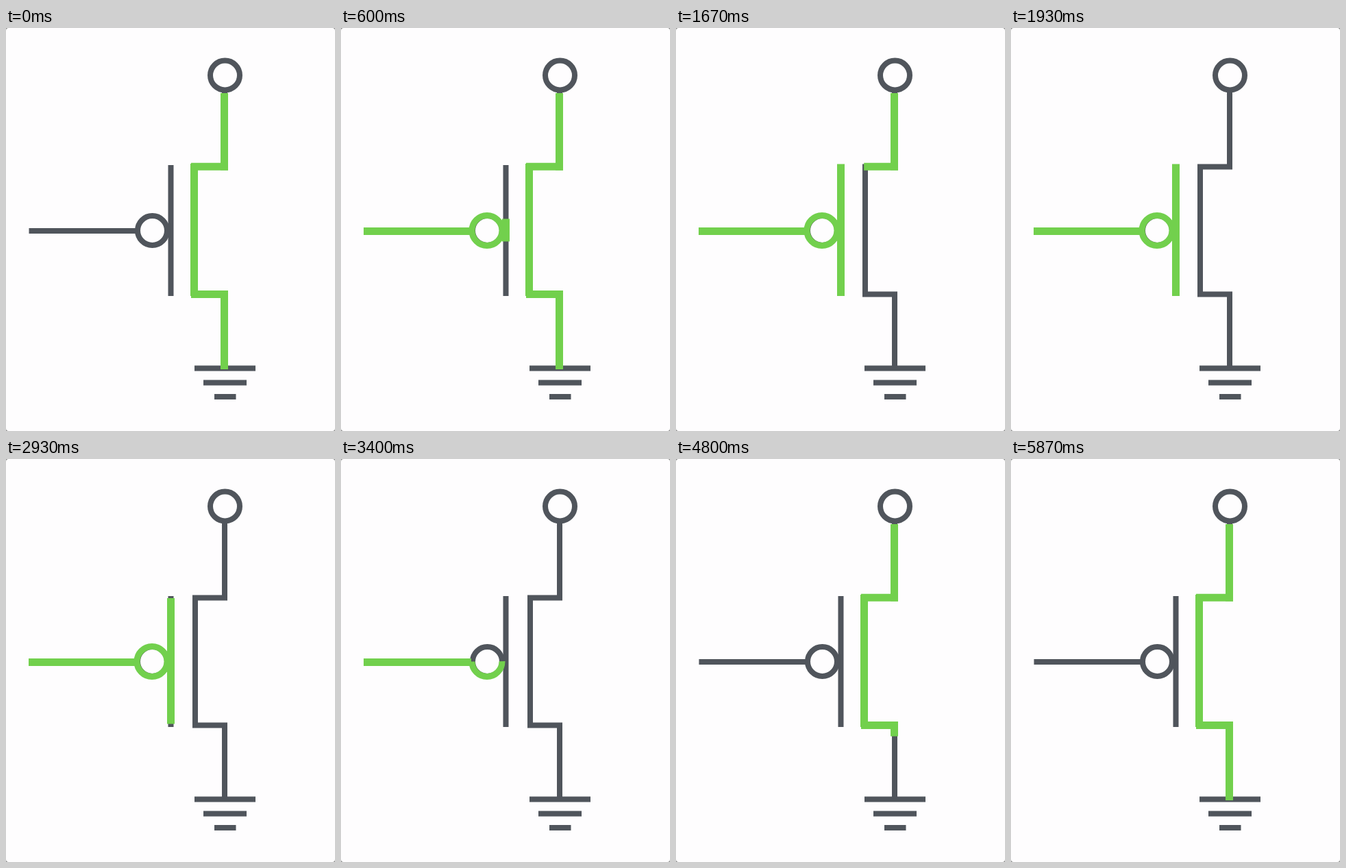
An HTML page that plays this animation: 480 px wide and 588 px high, repeating every 5940 ms.

```html
<!DOCTYPE html>
<html lang="en">
<head>
<meta charset="utf-8">
<title>P-channel transistor</title>
<style>
  html, body { margin: 0; width: 100%; height: 100%; overflow: hidden; background: #8b8b8b; }
  svg { display: block; width: 100%; height: 100%; }
  .wire { fill: none; stroke: #50555c; stroke-width: 8; }
  .live { fill: none; stroke: #72d04d; stroke-width: 11; }
</style>
</head>
<body>
<svg viewBox="0 0 480 588">
  <rect width="480" height="588" rx="4" fill="#fefdfe"/>
  <g class="wire">
    <path d="M33.5 296H190M240.5 200V391"/>
    <path d="M319 92V202.5H276V388.5H319V496"/>
    <path d="M275 496.5H364M288 517.5H351M304 538H335.5"/>
    <circle cx="213.5" cy="295.5" r="21.5"/>
    <circle cx="319.5" cy="69" r="21.5"/>
  </g>
  <g class="live" id="live"></g>
</svg>
<script>
const LOOP = 5940, STEP = 200 / 3;
const live = document.getElementById('live');

// d: path, on/off: [start, end] in ms, lit: state at the loop start
const gate = [
  { d: 'M33 296.5H190', on: [40, 250], off: [3540, 3735] },
  { d: 'M191 295.5A22 22 0 0 0 235 295.5A22 22 0 0 0 191 295.5', on: [250, 540], off: [3260, 3540], width: 9 },
  { d: 'M240.5 295V198.5', on: [540, 890], off: [2914, 3260] },
  { d: 'M240.5 295V391', on: [540, 890], off: [2914, 3260] }
];
const channel = [
  { d: 'M318.5 95V207.5', on: [4200, 4330], off: [1800, 1930] },
  { d: 'M324 202.2H270', on: [4330, 4470], off: [1659, 1800] },
  { d: 'M274.5 198V391', on: [4470, 4640], off: [1470, 1659] },
  { d: 'M270 388.5H324', on: [4640, 4770], off: [1330, 1470] },
  { d: 'M318.5 383V498', on: [4770, 4930], off: [1200, 1330] }
].map(p => ({ ...p, lit: 1 }));

const parts = [...gate, ...channel].map(p => {
  const el = document.createElementNS(live.namespaceURI, 'path');
  el.setAttribute('d', p.d);
  if (p.width) el.style.strokeWidth = p.width;
  live.append(el);
  return { lit: 0, ...p, el, len: el.getTotalLength() };
});

const ramp = (t, [a, b]) => Math.min(1, Math.max(0, (t - a) / (b - a)));

function draw(ms) {
  const t = Math.round(Math.floor((ms % LOOP + 4) / STEP) * STEP / 10) * 10;
  for (const { el, len, lit, on, off } of parts) {
    const k = lit + ramp(t, on) - ramp(t, off);
    el.style.display = k > 0.001 ? '' : 'none';
    el.style.strokeDasharray = k > 0.999 ? 'none' : `${len * k} ${len * 2}`;
  }
}

const start = performance.now();
function tick() {
  draw(performance.now() - start);
  requestAnimationFrame(tick);
}
tick();
</script>
</body>
</html>
```
